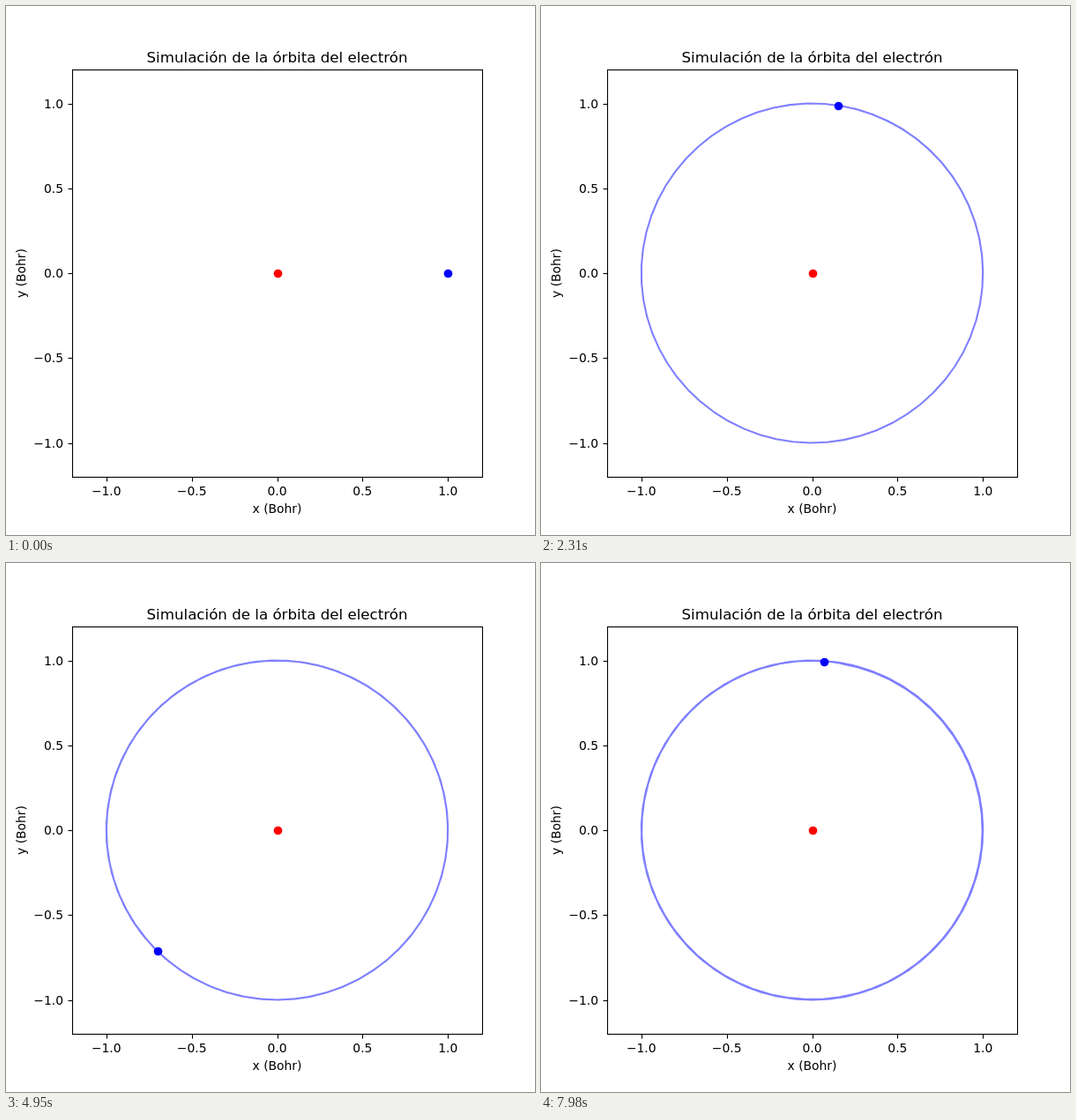
An HTML page with a canvas that plays this animation: 600x600 px, repeating every 8 s.

```html
<!DOCTYPE html>
<html lang="es">
<head>
<meta charset="utf-8">
<title>Órbita</title>
<style>
  html, body { margin: 0; width: 100%; height: 100%; overflow: hidden; background: #fff; }
  canvas { display: block; }
</style>
</head>
<body>
<canvas id="stage" width="600" height="600"></canvas>
<script>
const ctx = document.getElementById('stage').getContext('2d');
const LOOP = 8000, STEP = 30, LAST = 266;
const PT = 100 / 72; // pixels per point
const BOX = { left: 75, top: 72, right: 540, bottom: 534 };

const toX = x => 307.5 + 193.75 * x;
const toY = y => 303 - 192.5 * y;
const snap = v => Math.floor(v + 0.5) + 0.5;

// Circular orbit that slowly shrinks and therefore speeds up.
function electron(step) {
  const drift = step / LAST;
  const angle = 0.1 * step + 0.0335 * drift ** 4.3;
  const radius = 1 - 0.0035 * drift ** 3.3;
  return [toX(radius * Math.cos(angle)), toY(radius * Math.sin(angle))];
}
const orbit = Array.from({ length: LAST + 1 }, (_, step) => electron(step));

function line(x1, y1, x2, y2) {
  ctx.beginPath();
  ctx.moveTo(x1, y1);
  ctx.lineTo(x2, y2);
  ctx.stroke();
}

function text(label, x, y, points, align = 'center') {
  ctx.font = `${points * PT}px "DejaVu Sans", sans-serif`;
  ctx.textAlign = align;
  ctx.fillText(label, x, y);
}

function dot([x, y], color) {
  ctx.fillStyle = color;
  ctx.beginPath();
  ctx.arc(snap(x), snap(y), 3.5 * PT, 0, 2 * Math.PI);
  ctx.fill();
}

function drawTrail(count) {
  if (count < 2) return;
  ctx.strokeStyle = 'rgba(0, 0, 255, 0.5)';
  ctx.lineWidth = 1.5 * PT;
  ctx.lineJoin = 'round';
  ctx.lineCap = 'square';
  ctx.beginPath();
  for (const [x, y] of orbit.slice(0, count)) ctx.lineTo(x, y);
  ctx.stroke();
}

function drawAxes() {
  ctx.strokeStyle = ctx.fillStyle = '#000';
  ctx.lineWidth = 0.8 * PT;
  ctx.lineJoin = 'miter';
  ctx.lineCap = 'butt';
  ctx.strokeRect(BOX.left + 0.5, BOX.top + 0.5, BOX.right - BOX.left, BOX.bottom - BOX.top);

  for (const value of [-1, -0.5, 0, 0.5, 1]) {
    const label = value.toFixed(1).replace('-', '\u2212');
    const x = snap(toX(value)), y = snap(toY(value));
    line(x, BOX.bottom + 0.5, x, BOX.bottom + 5.5);
    line(BOX.left + 0.5, y, BOX.left - 4.5, y);
    text(label, toX(value), 555, 10);
    text(label, 65, Math.floor(y) + 5, 10, 'right');
  }

  text('Simulación de la órbita del electrón', 307.5, 64, 12);
  text('x (Bohr)', 307.5, 575, 10);
  ctx.save();
  ctx.translate(22, 303);
  ctx.rotate(-Math.PI / 2);
  text('y (Bohr)', 0, 0, 10);
  ctx.restore();
}

function draw() {
  const step = Math.min(LAST, Math.floor((performance.now() % LOOP) / STEP));
  ctx.fillStyle = '#fff';
  ctx.fillRect(0, 0, 600, 600);
  drawTrail(step);
  dot([toX(0), toY(0)], '#f00');
  dot(orbit[step], '#00f');
  drawAxes();
  requestAnimationFrame(draw);
}
draw();
</script>
</body>
</html>
```
